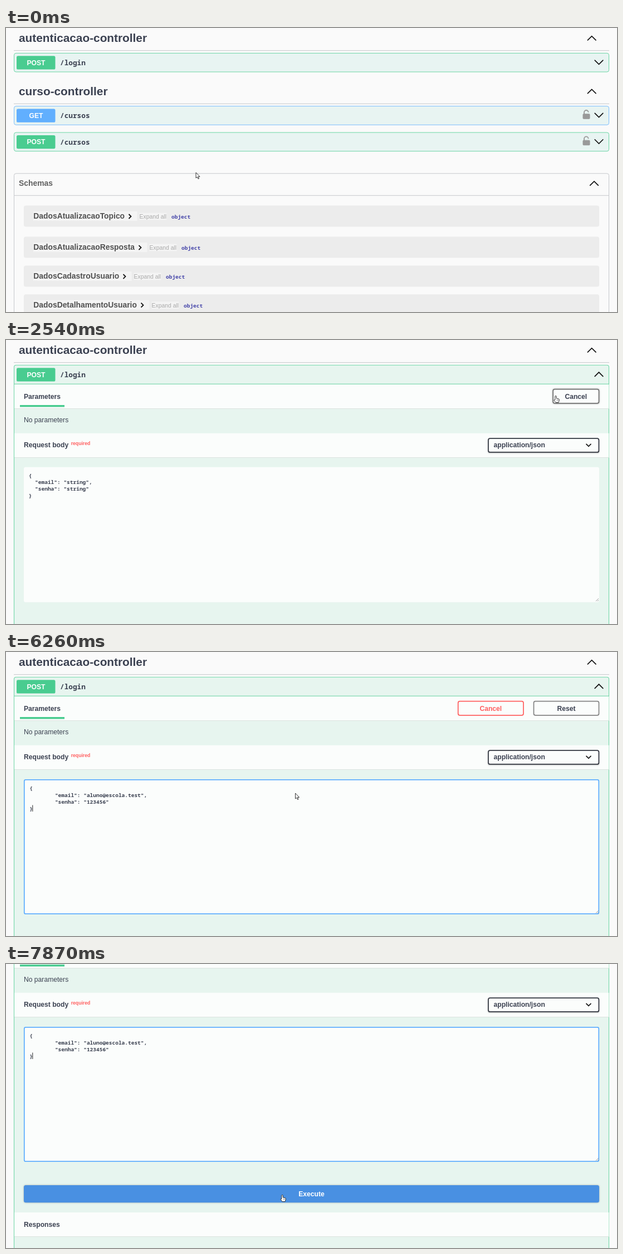
These frames come from a looping animation (1097 by 511 pixels, 8 s). An HTML page:

```html
<!DOCTYPE html>
<html lang="pt">
<head>
<meta charset="utf-8">
<style>
html, body { margin: 0; width: 100%; height: 100%; overflow: hidden; background: #fafafa }
svg { display: block; width: 1097px; height: 511px }
text { font: 12.13px "Liberation Sans", Arial, sans-serif; fill: #3b4151; white-space: pre }
.b { font-weight: bold }
.h { font-size: 20.8px; font-weight: bold }
.m { font-size: 13.87px; font-weight: bold; fill: #505050 }
.s { font-size: 10.4px }
.sb { font-size: 10.4px; font-weight: bold }
.code { font: bold 9.5px "Noto Sans Mono", monospace }
.path { font: bold 12.75px "Noto Sans Mono", monospace }
.white { fill: #fff }
.mid { text-anchor: middle; font-weight: bold }
</style>
</head>
<body>
<svg id="stage" viewBox="0 0 1097 511"></svg>
<script>
const LOOP = 8000, STEP = 400 / 3;
const GREEN = '#49cc90', BLUE = '#61affe', RED = '#ff6060', GREY = '#858585', INK = '#3b4151';
const PANEL = '#e7f5ef', PALE = '#fbfdfc', RULE = '#c6c8cc';

// Steps at which the interface changes
const HOVER = 5, OPEN = 7, LEAVE = 10, OVER_TRY = 17, TRY = 19, FOCUS = 28, SELECT = 34, PASTE = 36, OVER_RUN = 54;

// step, x, y, shape from there on
const pointer = [
  [0, 341, 260, 'arrow'], [5, 190, 72, 'hand'], [7, 185, 64, 'hand'], [8, 190, 68, 'hand'],
  [10, 260, 110, 'arrow'], [12, 520, 182, 'arrow'], [14, 820, 165, 'arrow'], [17, 980, 104, 'hand'],
  [18, 987, 100, 'hand'], [19, 987, 100, 'hand'], [20, 960, 116, 'arrow'], [22, 420, 240, 'beam'],
  [24, 46, 280, 'beam'], [26, 43, 283, 'beam'], [28, 43, 283, 'beam'], [31, 224, 256, 'beam'],
  [34, 224, 256, 'beam'], [42, 500, 235, 'beam'], [44, 545, 216, 'arrow'], [46, 559, 210, 'arrow'],
  [48, 480, 298, 'beam'], [49, 456, 322, 'beam'], [50, 452, 338, 'beam'], [54, 488, 408, 'hand'],
  [56, 495, 414, 'hand'], [59, 496, 415, 'hand']
];
const scroll = [[0, 0], [47, 0], [48, 12], [49, 62.5], [50, 116], [60, 116]];

function at(keys, k) {
  let i = 0;
  while (i < keys.length - 1 && keys[i + 1][0] <= k) i++;
  const a = keys[i], b = keys[i + 1] || a;
  const p = a === b ? 0 : (k - a[0]) / (b[0] - a[0]);
  return a.slice(1).map((v, j) => typeof v === 'number' ? v + (b[j + 1] - v) * p : v);
}

const text = (x, y, str, cls = '', extra = '') => `<text x="${x}" y="${y}" class="${cls}" ${extra}>${str}</text>`;
const rect = (x, y, w, h, fill, r = 0, extra = '') =>
  `<rect x="${x}" y="${y}" width="${w}" height="${h}" rx="${r}" fill="${fill}" ${extra}/>`;
const line = (d, color = RULE, w = 1, extra = '') =>
  `<path d="${d}" fill="none" stroke="${color}" stroke-width="${w}" ${extra}/>`;
const stroke = (color, w) => `stroke="${color}" stroke-width="${w}"`;
const shadow = (blur, alpha, y = 0) => `style="filter:drop-shadow(0 ${y}px ${blur}px rgba(0,0,0,${alpha}))"`;
const chevron = (x, y, up, w = 7.3) => {
  const h = up ? -w / 2 : w / 2;
  return line(`M${x - w} ${y - h}L${x} ${y + h}L${x + w} ${y - h}`, '#111', 1.7, 'stroke-linecap="round"');
};
const button = (x, w, label, color, ink, hover) =>
  rect(x, 88.7, w, 25.1, PALE, 3, stroke(color, 1.75) + (hover ? shadow(1.5, .35) : '')) +
  text(x + w / 2, 105.6, label, 'mid', `style="fill:${ink}"`);
const band = (y, h = 43.5) => rect(15, y, 1067.5, h, PALE) + line(`M15 ${y + h + .2}H1082.5`, '#dbe3df');

const lock = y => `<g fill="#999" stroke="#999"><path d="M1038 ${y + 7}V${y + 3.5}a3.8 3.8 0 0 1 7.6 0" fill="none" stroke-width="1.8"/>` +
  rect(1036, y + 6.5, 12, 8.5, '#999', 1) + '</g>';

const badge = (y, verb, color) =>
  rect(19, y + 5.3, 69.5, 24.2, color, 2.6) + text(54, y + 21.6, verb, 'mid white');

function operation(y, verb, path, color, locked) {
  return rect(14.5, y + .3, 1068, 33.7, '#e8f4f2', 3.5, stroke(color, 1) + ' stroke-opacity=".8"') +
    badge(y, verb, color) + text(97, y + 22, path, 'path') +
    chevron(1064.5, y + 16.7) + (locked ? lock(y + 8) : '');
}

const tagTitle = (y, name) =>
  text(23, y, name, 'h') + chevron(1051.7, y - 7, true) + line(`M14 ${y + 15.3}H1083`);

const copyIcon = () => rect(1026, 51.3, 20, 22.5, '#7d8293', 3.5) +
  line('M1034 57.5H1031.5V68.5H1041.5V66M1038.5 57.5H1041.5V60M1034 56.3H1038.5V58.8H1034ZM1033.5 62H1036M1033.5 65H1035M1044 63H1037.5L1039.8 60.8M1037.5 63L1039.8 65.2', '#fff', 1);

function model(name, end, c) {
  return rect(32, c - 19, 1033, 38, '#ececec', 3.5) +
    rect(49, c - 8.5, end - 27, 17, '#f4f4f4') + rect(end + 26, c - 6, 49, 13, '#f4f4f4') +
    text(49.3, c + 4.7, name, 'm') +
    line(`M${end + 7} ${c - 3.5}l4 4l-4 4`, '#111', 1.8) +
    text(end + 26, c + 4.6, 'Expand all', 's', 'style="fill:#aaa"') +
    text(end + 83.5, c + 4.3, 'object', 'code', 'style="fill:#4343a8"');
}

const closedPage = () =>
  operation(45, 'POST', '/login', GREEN) + tagTitle(121, 'curso-controller') +
  operation(140.3, 'GET', '/cursos', BLUE, true) + operation(187.7, 'POST', '/cursos', GREEN, true) +
  rect(14.5, 261.8, 1068, 300, 'none', 3.5, stroke(RULE, 1)) +
  text(23, 283.7, 'Schemas', 'm', 'style="fill:#606060"') + chevron(1056, 279.5, true) + line('M15 301.3H1082') +
  model('DadosAtualizacaoTopico', 213.5, 338.5) + model('DadosAtualizacaoResposta', 231.5, 394.6) +
  model('DadosCadastroUsuario', 203.5, 446.6) + model('DadosDetalhamentoUsuario', 235.5, 498.2);

const exampleBlock = () => {
  const field = (y, name, tail) => text(37, y,
    `  "${name}": <tspan fill="#a2fca2">"string"</tspan>${tail}`, 'code white');
  return text(32, 243.6, 'Example Value', 'sb') + line('M109.7 234V247') + text(115, 243.6, 'Schema', 's') +
    rect(32, 257, 1033, 62.7, '#333', 3.5) +
    text(37, 272.3, '{', 'code white') + field(285, 'email', ',') + field(297.7, 'senha', '') +
    text(37, 310.4, '}', 'code white');
};

const responses = () => band(563, 43.3) + text(32, 588.8, 'Responses', 'b') +
  text(32, 645, 'Code', 'b') + text(105, 645, 'Description', 'sb') + text(1016.5, 645, 'Links', 'b') +
  line('M32 658.6H1065') + text(32, 678.8, '200') + text(105, 681, 'OK', '', 'style="font-size:13.87px"') +
  text(1016.5, 678.8, 'No links', '', 'font-style="italic"') +
  text(105, 706.5, 'Media type', '', 'style="font-size:9.75px"');

function editor(k) {
  const focused = k >= FOCUS, selected = k >= SELECT && k < PASTE, pasted = k >= PASTE;
  const lines = pasted
    ? ['{', '        "email": "aluno@escola.test",', '        "senha": "123456"', '}']
    : ['{', '  "email": "string",', '  "senha": "string"', '}'];
  const d = focused ? 0 : -1.6;
  let out = focused
    ? rect(32.8, 229.8, 1031.5, 241.4, PALE, 2.5, stroke(BLUE, 1.8))
    : rect(32, 228.7, 1033, 243, PALE, 3);
  out += line('M1059 470l5-5M1062 470l2-2', '#888', .8);
  lines.forEach((str, i) => {
    const chars = str.length + (i < 3 ? 1 : 0);
    if (selected) out += rect(42.3, 238.3 + i * 12.2, chars * 5.7, 12.4, '#3166cf');
    out += text(42.3 + d, 248.4 + d + i * 12.1, str, selected ? 'code white' : 'code');
  });
  const t = k * STEP;
  const caret = pasted ? (t - 4799 + LOOP) % 1000 < 500 : focused && t < 4130;
  return out + (caret ? line('M47.8 275.5V287', '#222', 1) : '');
}

function buttons(k) {
  if (k < TRY) return button(970.7, 93.8, 'Try it out', GREY, INK, k >= OVER_TRY);
  if (k >= PASTE) return button(811.7, 117.3, 'Cancel', RED, RED) + button(947.5, 117, 'Reset', GREY, INK);
  const p = Math.min(1, (k - TRY) * STEP / 300) * 100;
  const fade = from => `color-mix(in srgb, ${RED} ${p}%, ${from})`;
  return `<g>${button(982.2, 82.3, 'Cancel', RED, fade(INK), k < TRY + 1)
    .replace(`stroke="${RED}"`, `stroke="${p ? RED : '#747474'}"`)}</g>`;
}

function openPage(k) {
  const trying = k >= TRY;
  return rect(14.5, 45.3, 1068, 900, PANEL, 3.5, stroke(GREEN, 1.1) + ' stroke-opacity=".75"') +
    badge(45, 'POST', GREEN) + text(97, 67, '/login', 'path') + chevron(1064.5, 61.7, true) +
    (trying ? '' : rect(19, 50.5, 1002.5, 24.6, 'none', 2, stroke('#30343c', 1.8))) +
    band(79.8) + line('M15 79.2H1082.5', GREEN, 1, 'stroke-opacity=".8"') +
    text(32, 105.6, 'Parameters', 'b') + rect(25, 117, 80, 3.5, GREEN) + buttons(k) +
    text(32, 147.5, 'No parameters') +
    band(167.8) + text(32, 193.2, 'Request body', 'b') +
    text(116.7, 188.7, 'required', 'b', 'style="font-size:8.67px;fill:#ff5f5f"') +
    rect(866, 177.2, 198.4, 24.7, PALE, 3, stroke('#343842', 1.75) + shadow(1, .25, 1)) +
    text(875.5, 193.2, 'application/json', 'b') + chevron(1046, 189.4, false, 4) +
    (trying
      ? editor(k) + rect(32, 514, 1033, 31.3, '#4990e2', 3.5, k >= OVER_RUN ? shadow(1.8, .3) : '') +
        text(548.5, 533.7, 'Execute', 'mid white') + responses()
      : exampleBlock() + `<g transform="translate(0 -191)">${responses()}</g>`);
}

const shapes = {
  arrow: '<path d="M0 0V10L2.3 8L4 11.5L5.5 11L4 7.5H7Z" fill="#fff" stroke="#222" stroke-width=".9"/>',
  hand: '<path d="M-1.2 1.2Q0-.6 1.2 1.2V5L5 5.8Q6.6 6.2 6.4 8L5 12.5H0L-3 8.6Q-3 6.8-1.2 8Z" fill="#fff" stroke="#222" stroke-width=".9"/><path d="M2.5 7V9M4.4 7.3V9" stroke="#222" stroke-width=".6"/>',
  beam: '<path d="M-3.3-5H3.3M-3.3 5H3.3M0-5V5" fill="none" stroke="#555" stroke-width="1.5"/>'
};

function picture(k) {
  const [x, y, shape] = at(pointer, k);
  return `<g transform="translate(0 ${-at(scroll, k)[0]})">` +
    tagTitle(25.3, 'autenticacao-controller') + (k < OPEN ? closedPage() : openPage(k)) +
    (k >= HOVER && k < LEAVE ? copyIcon() : '') + '</g>' +
    `<g transform="translate(${x} ${y})">${shapes[shape]}</g>`;
}

const stage = document.getElementById('stage');
let shown = -1;
function tick() {
  const k = Math.min(59, Math.floor((performance.now() % LOOP + 15) / STEP));
  if (k !== shown) stage.innerHTML = picture(shown = k);
  requestAnimationFrame(tick);
}
tick();
</script>
</body>
</html>
```
